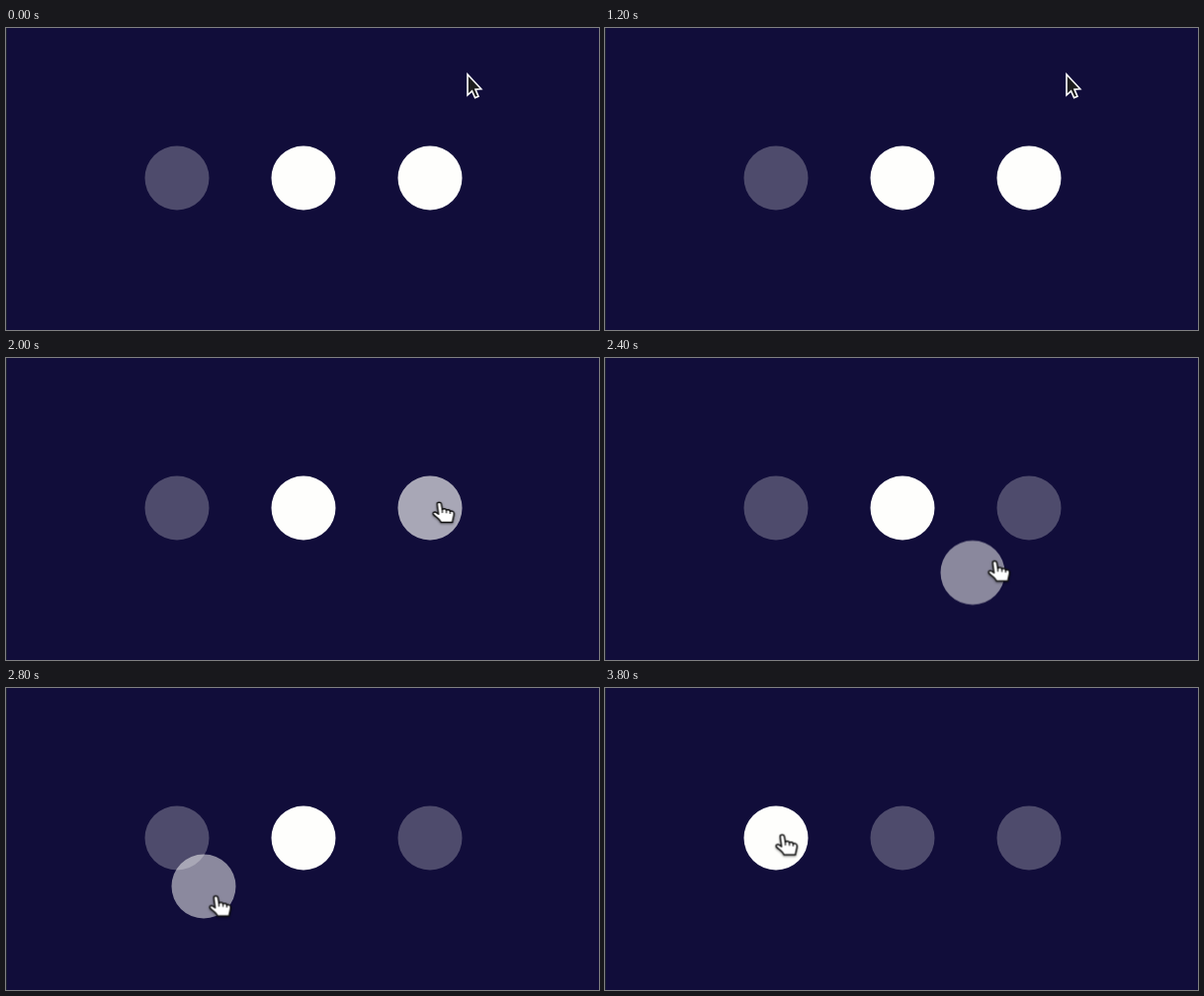
An HTML page without scripts for the animation above (4.5 s loop, 600 by 306 pixels).

```html
<!DOCTYPE html>
<html lang="en">
<head>
<meta charset="utf-8">
<title>Peg jump</title>
<style>
  html, body { margin: 0; width: 100%; height: 100%; overflow: hidden; background: #110d3a; }
  svg { display: block; width: 600px; height: 306px; }

  .peg { fill: #fefefc; }
  .empty { opacity: .256; }

  .anim { animation: 4.5s step-end infinite; }
  .filled { animation-name: fill-up; }
  .jumped { animation-name: jumped; }
  .lifted { animation-name: lifted; }
  .drag { animation-name: drag; }
  .arrow { animation-name: arrow; }
  .hand { animation-name: hand; }

  .arrow { fill: #1e1e1e; stroke: #fff; stroke-width: 1.6; }
  .hand { fill: #fff; stroke: #111; stroke-width: 1.5; stroke-linejoin: round; stroke-linecap: round;
          filter: drop-shadow(0 1px 1px rgba(0, 0, 0, .4)); }
  .knuckles { stroke-width: 1.2; }

  @keyframes fill-up { 0% { opacity: .256 } 71.11%, 100% { opacity: 1 } }
  @keyframes jumped { 0% { opacity: 1 } 71.11%, 100% { opacity: .256 } }
  @keyframes lifted { 0% { opacity: 1 } 42.22%, 100% { opacity: .256 } }

  @keyframes drag {
    0% { opacity: 0; transform: translate(429px, 152px) }
    42.22% { opacity: .517; transform: translate(429px, 152px) }
    46.66% { transform: translate(430px, 154px) }
    48.88% { transform: translate(429px, 165px) }
    51.11% { transform: translate(419.5px, 185px) }
    53.33% { transform: translate(372px, 217.5px) }
    55.55% { transform: translate(321px, 234px) }
    57.77% { transform: translate(275px, 237px) }
    60% { transform: translate(232px, 226px) }
    62.22% { transform: translate(200px, 201px) }
    64.44% { transform: translate(184.5px, 172px) }
    66.66% { transform: translate(179px, 152px) }
    68.88% { opacity: .517; transform: translate(178px, 149.5px) }
    71.11%, 100% { opacity: 0; transform: translate(173px, 152px) }
  }

  @keyframes arrow {
    0% { opacity: 1; transform: translate(467px, 47px) }
    28.88% { transform: translate(463px, 56px) }
    31.11% { transform: translate(449px, 84px) }
    33.33% { opacity: 1; transform: translate(430px, 113px) }
    35.55%, 100% { opacity: 0; transform: translate(418px, 134px) }
  }

  @keyframes hand {
    0% { opacity: 0; transform: translate(418px, 134px) }
    35.55% { opacity: 1; transform: translate(418px, 134px) }
    37.77% { transform: translate(417px, 139px) }
    40% { transform: translate(430px, 143px) }
    42.22% { transform: translate(440px, 146px) }
    44.44% { transform: translate(438.5px, 146px) }
    46.66% { transform: translate(436px, 150px) }
    48.88% { transform: translate(437px, 159px) }
    51.11% { transform: translate(435px, 175px) }
    53.33% { transform: translate(394.5px, 205.5px) }
    55.55% { transform: translate(345px, 227px) }
    57.77% { transform: translate(297px, 237px) }
    60% { transform: translate(250px, 230px) }
    62.22% { transform: translate(212.5px, 210.5px) }
    64.44% { transform: translate(193px, 182px) }
    66.66% { transform: translate(183px, 158px) }
    68.88% { transform: translate(180px, 149px) }
    71.11%, 100% { opacity: 1; transform: translate(179.5px, 148.5px) }
  }
</style>
</head>
<body>
<svg viewBox="0 0 600 306">
  <rect width="600" height="306" fill="#110d3a"/>
  <rect width="1" height="306" fill="#1c2030"/>

  <circle class="peg anim filled" cx="173" cy="152" r="32.5"/>
  <circle class="peg anim jumped" cx="301" cy="152" r="32.5"/>
  <circle class="peg anim lifted" cx="429" cy="152" r="32.5"/>
  <circle class="peg anim drag" r="32.5"/>

  <path class="anim arrow" d="M0 0V21L4.5 16.8 7.6 23.8 11 22.3 8 15.3 13.8 14.8Z"/>
  <g class="anim hand">
    <path d="M-2.3 2C-2.3-.4 1.6-.4 2 2L3 7.6C4 6.2 6.8 6.4 7.1 8.2 8.2 7.2 10.6 7.6 10.9 9.4 12.4 8.6 14.8 9.4 14.8 11.6 14.8 15 13.6 16.4 13.2 20.5H1.6C.6 17.6-3 15.6-6 12.6-7.4 10.8-5 9-3 10.6L-.9 12.2Z"/>
    <path class="knuckles" d="M3 7.6v3M7.1 8.2v2.6M10.9 9.4v2"/>
  </g>
</svg>
</body>
</html>
```
